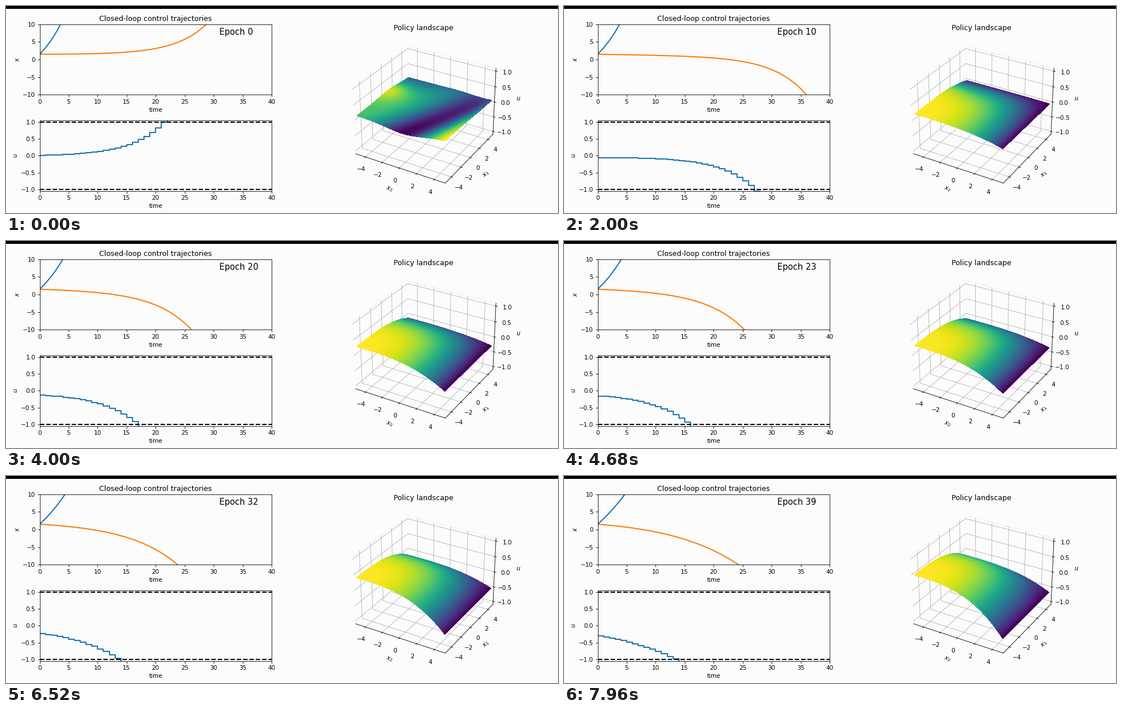
These frames come from a looping animation (960 by 360 pixels, 8000 ms). A matplotlib script:

```python
import numpy as np
import matplotlib.pyplot as plt
from matplotlib.animation import FuncAnimation
from matplotlib.patches import Rectangle

W, H, DPI = 960, 360, 75
EPOCHS, EPOCH_MS = 40, 200
STEPS = 40
BG = "#fcfcfc"

k = np.arange(STEPS + 1)
N = 51
P, Q = np.meshgrid(np.linspace(-1, 1, N), np.linspace(-1, 1, N))


def control(e):
    """Exponential feedback signal whose gain flips sign during training."""
    first = 0.015 - 0.0065 * e - 0.00004 * e**2
    growth = 1.2 - 0.12 * (e / 39) ** 2.3
    gain = np.interp(e, [0, 5, 10, 20, 26, 32, 39],
                     [0.213, 0.113, -0.075, -0.465, -0.636, -0.732, -0.69])
    return first + gain * (growth**k - growth) / (growth**14 - growth)


def rollout(u):
    """Unstable linear system driven by u from (1.5, 1.5)."""
    x = np.full((STEPS + 1, 2), 1.5)
    for i in range(STEPS):
        x1, x2 = x[i]
        x[i + 1] = 1.2 * x1 + x2 + u[i], x2 + 0.5 * u[i]
    return x


def policy(e):
    """Plateau that drops towards +x2 and +x1, with fading early ripples."""
    top = 0.14 + 0.0045 * e + 0.0001 * e**2
    drop_p = 0.03 * e - 0.06
    drop_q = 0.0155 * e + 0.07
    a, b = ((1 + P) / 2) ** 3, ((1 + Q) / 2) ** 3
    z = top - drop_p * a - drop_q * b * (1 - a)
    valley = np.exp(-((P - 0.1 - 0.45 * (1 + Q)) / 0.55) ** 2)
    bump = np.exp(-((P + 1) ** 2 + (Q - 0.2) ** 2) / 0.2)
    z += 0.05 * np.exp(-e / 10) * bump - 0.13 * np.exp(-e / 3) * valley
    return 1.05 * z


def box(left, top, right, bottom):
    return [left / W, 1 - bottom / H, (right - left) / W, (bottom - top) / H]


fig = plt.figure(figsize=(W / DPI, H / DPI), dpi=DPI, facecolor=BG)
fig.add_artist(Rectangle((0, 1 - 5 / H), 1, 5 / H, color="black", lw=0,
                         transform=fig.transFigure))

ax_x = fig.add_axes(box(58.5, 31.8, 462, 154.4), facecolor=BG)
ax_x.set(xlim=(0, 40), ylim=(-10, 10), xlabel="time", ylabel="$x$",
         title="Closed-loop control trajectories")
ax_x.set_yticks(range(-10, 11, 5))
line1, = ax_x.plot([], [], lw=2)
line2, = ax_x.plot([], [], lw=2)
label = ax_x.text(31, 7, "", fontsize=14)

ax_u = fig.add_axes(box(58.5, 199, 462, 321.8), facecolor=BG)
ax_u.set(xlim=(0, 40), ylim=(-1.05, 1.05), xlabel="time", ylabel="$u$")
ax_u.set_yticks(np.linspace(-1, 1, 5))
line_u, = ax_u.plot([], [], lw=2, drawstyle="steps")
for bound in (-1, 1):
    ax_u.plot([0, 40], [bound, bound], "k--", lw=2)

ax_p = fig.add_axes(box(587, 47.7, 864.8, 325.5), projection="3d", facecolor="none")
ax_p.view_init(elev=30, azim=-60)
side, height = 5 * 25 / 24, 1.05 * 25 / 24
ax_p.set(xlim=(-side, side), ylim=(-side, side), zlim=(-height, height),
         xlabel="$x_2$", ylabel="$x_1$", zlabel="$u$")
ax_p.set_title("Policy landscape", pad=5)
ax_p.set_xticks(range(-4, 5, 2))
ax_p.set_yticks(range(-4, 5, 2))
ax_p.set_zticks(np.linspace(-1, 1, 5))
for axis in (ax_p.xaxis, ax_p.yaxis, ax_p.zaxis):
    axis.pane.fill = False

surface = None


def draw(epoch):
    global surface
    u = control(epoch)
    x = rollout(u)
    line1.set_data(k, x[:, 0])
    line2.set_data(k, x[:, 1])
    line_u.set_data(k, u)
    label.set_text(f"Epoch {epoch}")
    if surface is not None:
        surface.remove()
    surface = ax_p.plot_surface(5 * P, 5 * Q, policy(epoch), cmap="viridis",
                                linewidth=0, antialiased=False,
                                rcount=N, ccount=N)
    return line1, line2, line_u, label, surface


anim = FuncAnimation(fig, draw, frames=EPOCHS, interval=EPOCH_MS,
                     repeat=True, repeat_delay=0, blit=False)
plt.show()
```
